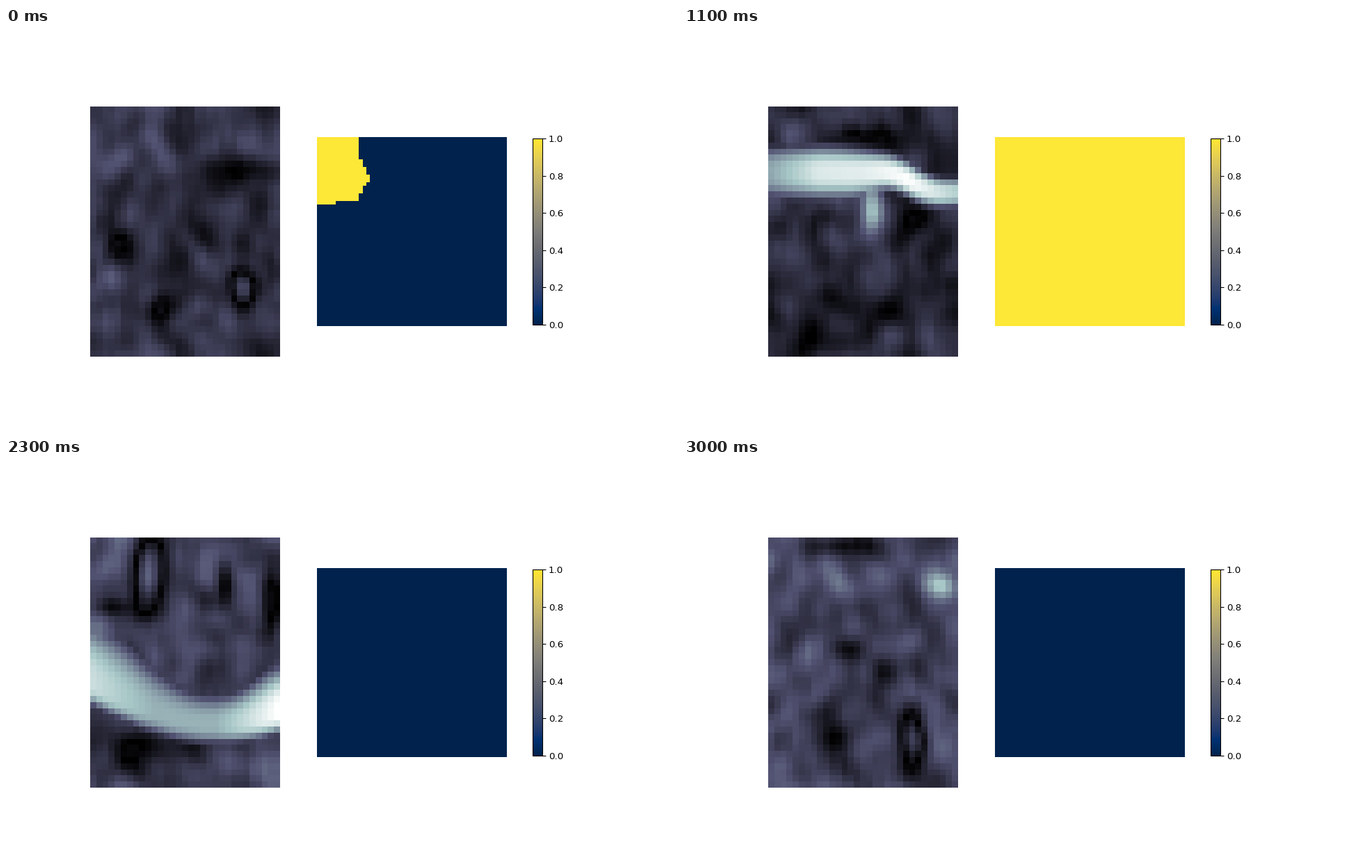
A matplotlib script that plays this animation: 966x580 px, repeating every 3.1 s.

```python
import numpy as np
import matplotlib.pyplot as plt
from matplotlib.animation import FuncAnimation
from matplotlib.path import Path

FRAMES, STEP_MS = 31, 100
ROWS, COLS, GRID = 41, 31, 50
KEYS = [0, 7, 11, 16, 23, 28, 30]    # steps at which a scene is fully reached
SCALE = 0.966                        # text and tick size against the defaults

Y, X = np.mgrid[:ROWS, :COLS].astype(float)
COL = np.arange(COLS)


# ---- scan panel -------------------------------------------------------

def tissue(level, *spots):
    """Signed signal: a flat level plus Gaussian spots (x, y, rx, ry, amp)."""
    return level + sum(amp * np.exp(-((X - x) / rx) ** 2 - ((Y - y) / ry) ** 2)
                       for x, y, rx, ry, amp in spots)


TISSUE = [
    tissue(.22, (24.5, 29.5, 2, 3.2, -.6), (26.5, 10, 5, 2, -.22),
           (4.3, 21.5, 2, 2, -.2), (11, 33, 1.8, 4, -.2), (2, 28, 3, 3, .12)),
    tissue(.19, (16, 9, 1.8, 6, .22), (29, 12, 2, 2, .25),
           (20, 15.5, 4, 2, -.17), (2.7, 24.5, 3, 2, -.2)),
    tissue(.2, (23.3, 18.5, 3, 3, -.25), (17, 5, 6, 2, -.18),
           (16.5, 16.5, 1.8, 4.5, .55), (15, 32, 16, 8, -.06)),
    tissue(.23, (15.5, 5.5, 3, 1.8, -.25), (24.7, 17, 2.5, 3, -.24),
           (30, 16.3, 2, 1.6, .5), (14, 29.5, 5, 2, -.22), (4, 2.5, 2, 3.5, -.23)),
    tissue(.31, (9, 5.5, 2.6, 6, -.75), (6, 34, 10, 5.5, -.28),
           (21.5, 7.5, 1.2, 3.5, -.28), (29.3, 11, 1.8, 7, -.4), (3, 11, 3, 1.6, -.27)),
    tissue(.27, (26.4, 7.7, 1.8, 1.7, .42), (10.5, 7, .9, 7, -.25),
           (20.7, 21.3, 1.8, 1.8, -.28), (25.3, 34, 3, 4, -.65), (3, 39, 5, 2, -.26)),
    tissue(.31, (27.5, 7.5, 2.5, 2, .38), (12.3, 18, 2.8, 2, -.31), (17.5, 24, 2, 4, -.24),
           (10, 32, 2.8, 6, -.24), (23, 33, 2.2, 4.5, -.6), (11, 1, 7, 2, -.3)),
]


def ease(start, end):
    """Smooth rise from 0 to 1 over the columns start to end."""
    t = np.clip((COL - start) / (end - start), 0, 1)
    return t * t * (3 - 2 * t)


def vessel(center, above, below, *glow):
    """Centre line, thickness on both sides and brightness, per column."""
    glow = np.interp(COL, np.linspace(0, COLS - 1, len(glow)), glow)
    return np.array([center, above + 0 * COL, below + 0 * COL, glow])


wide = vessel(10.3 + 3.4 * ease(18, 28), 4.2 - 1.8 * ease(8, 26),
              4.4 - 2 * ease(12, 22), .65, .9, .92, 1, .8)
hook = vessel(10.5 + 13.8 * ease(12, 24), 3, 3, .55, .85, 1, .8, .75)
bowl = vessel(23.8 + 6.5 * np.sin(np.pi * COL / 40), 9 - 4 * ease(2, 18) + 2 * ease(22, 30),
              3, .85, .68, .68, 1)
slope = vessel(21.5 + 6 * ease(4, 18), 3, 3, .45, .63, .74, .4, .52)
FADE = [[1], [1], [1], [0]]
VESSEL = [wide * FADE, wide * FADE, wide, hook, bowl, slope, slope * FADE]


def draw_vessel(center, above, below, glow):
    d = (Y - center) / np.hypot(1, np.gradient(center))
    return glow * np.exp(-np.abs(d / np.where(d < 0, above, below)) ** 3)


def grain():
    """Smooth seeded texture over time and space, with unit spread."""
    g = np.random.default_rng(4).normal(size=(FRAMES, ROWS, COLS))
    for axis in (0, 1, 1, 1, 2, 2):
        g = g + np.roll(g, 1, axis) + np.roll(g, -1, axis)
    return .06 * g / g.std()


GRAIN = grain()


# ---- mask panel -------------------------------------------------------

C = np.arange(GRID) + .5
CELLS = np.stack(np.meshgrid(C, C), axis=-1).reshape(-1, 2)
GAP = np.hypot(*(CELLS[:, None] - CELLS[None]).transpose(2, 0, 1))


def region(*points):
    """Cells whose centre lies inside the outline."""
    return Path(points + points[:1]).contains_points(CELLS)


def signed_distance(mask):
    if mask.all() or not mask.any():
        return np.full(mask.shape, 15. if mask.all() else -15.)
    return np.where(mask, GAP[:, ~mask].min(axis=1), -GAP[:, mask].min(axis=1))


full = np.ones(GRID * GRID, bool)
corner = region((0, 0), (11, 0), (11.4, 6), (14, 11), (11, 15.5), (11, 17),
                (5, 17), (5, 18), (0, 18))
islands = (
    region((0, 0), (8, 0), (8, 6), (12.2, 9), (12.8, 11), (11, 14.7), (7.5, 15.5),
           (6, 18), (6, 23.5), (4, 28), (0, 28), (0, 14), (5, 14), (5, 9), (0, 9))
    | region((0, 35), (9.5, 33), (13, 35), (21, 39.5), (16, 43.5), (14, 47), (14, 50), (0, 50))
    | region((27, 39.7), (31, 36), (45, 36), (50, 37), (50, 50), (40, 50), (40, 46), (33, 42.5))
    | region((44, 17), (45, 16), (50, 16), (50, 26), (46, 26), (45.4, 19))
    | region((39, 10), (42, 11.5), (39, 14)))
hole = region((15, 17.5), (17, 15), (20, 15), (22, 17), (28, 17), (31, 15), (34, 15),
              (38, 18), (38, 26), (45, 32.5), (36, 35), (31, 35), (27, 32), (27, 27),
              (25, 22), (17, 22))
slot = region((32, 0), (33, 0), (33, 4), (32, 4))
bay = region((12, 0), (50, 0), (50, 22), (46, 22), (40, 34), (32, 39), (27, 36),
             (18, 33.3), (18, 24), (16, 11), (12, 4))
islet = region((36, 10.5), (38, 8), (41, 8), (41, 15), (39.4, 17))
SHAPE = [signed_distance(m) for m in
         (corner, islands, full, ~(hole | slot), ~full, ~bay | islet, ~full)]


# ---- animation --------------------------------------------------------

def blend(scenes, n):
    i = min(np.searchsorted(KEYS, n, "right") - 1, len(KEYS) - 2)
    t = (n - KEYS[i]) / (KEYS[i + 1] - KEYS[i])
    return (1 - t) * scenes[i] + t * scenes[i + 1]


def scan_at(n):
    # Taking the magnitude turns zero crossings into thin dark outlines.
    base = np.abs(blend(TISSUE, n) + GRAIN[n])
    return np.clip(np.maximum(base, draw_vessel(*blend(VESSEL, n))), 0, 1)


def mask_at(n):
    return (blend(SHAPE, n) > 0).astype(float).reshape(GRID, GRID)


plt.rcParams.update({
    "font.size": 10 * SCALE,
    "ytick.major.size": 3.5 * SCALE,
    "ytick.major.pad": 3.5 * SCALE,
})
fig, axes = plt.subplots(1, 2, figsize=(9.66, 5.8), dpi=100)
style = dict(vmin=0, vmax=1, interpolation="nearest")
scan = axes[0].imshow(scan_at(0), cmap="bone", **style)
mask = axes[1].imshow(mask_at(0), cmap="cividis", **style)
for ax in axes:
    ax.axis("off")
fig.colorbar(mask, ax=axes, shrink=0.6)


def update(n):
    scan.set_data(scan_at(n))
    mask.set_data(mask_at(n))
    return scan, mask


anim = FuncAnimation(fig, update, frames=FRAMES, interval=STEP_MS, repeat=True)
plt.show()
```
